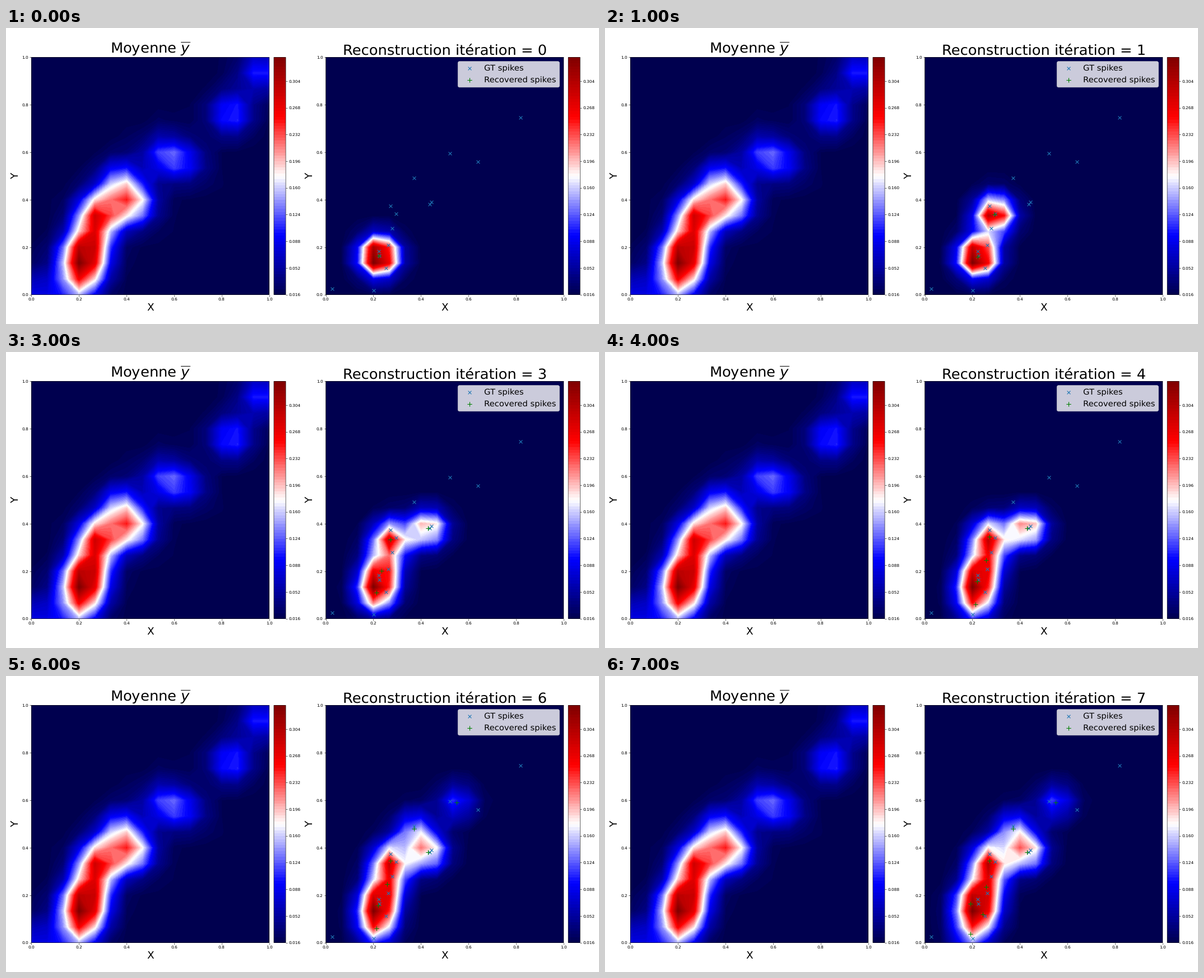
A matplotlib script for the animation above (8 s loop, 1058 px wide and 529 px high).

```python
import numpy as np
import matplotlib.pyplot as plt
from matplotlib.animation import FuncAnimation

WIDTH, HEIGHT, DPI = 1058, 529, 52.9
SIDE, TOP = 424.3, 52.35
CMAP, BANDS = "seismic", 80
SPREAD, MEAN_SPREAD = 0.0055, 0.0066  # twice the variance of each blur
PENALTY = 0.3

grid = np.linspace(0, 1, 16)
gx, gy = np.meshgrid(grid, grid)

TRUE_SPIKES = [
    (.026, .026), (.202, .017), (.254, .113), (.224, .163), (.223, .182),
    (.263, .210), (.280, .280), (.296, .342), (.273, .374), (.436, .380),
    (.445, .390), (.372, .492), (.521, .595), (.640, .560), (.819, .746),
]

# Sources along the filament, then the faint ones that are never recovered.
foot = [(.193, .038), (.244, .120), (.193, .165), (.258, .236)]
bend, east, bump, north = (.272, .346), (.431, .380), (.371, .479), (.550, .591)
faint = [(.335, .360), (.645, .560), (.838, .762), (.965, .940), (.025, .010)]
SOURCES = foot + [bend, east, bump, north] + faint
STRENGTHS = [.50, .50, .60, .60, .68, .62, .45, .31, .20, .28, .38, .34, .25]

column = [(.213, .061), (.219, .158), (.258, .247), bend, east]
ITERATIONS = [
    [(.223, .163)],
    [(.222, .160), (.293, .338)],
    [(.221, .158), (.269, .330), east],
    [(.213, .110), (.234, .203), (.272, .335), east],
    column,
    column + [north],
    column + [north, bump],
    foot + [bend, east, north, bump],
]


def kernel(points, spread):
    """One column per point: its Gaussian spot on the flattened grid."""
    x, y = np.transpose(points)
    dist2 = (gx.reshape(-1, 1) - x) ** 2 + (gy.reshape(-1, 1) - y) ** 2
    return np.exp(-dist2 / spread)


def reconstruct(points):
    """Penalised least-squares fit of the mean image, scaled to a peak of one."""
    spots = kernel(points, SPREAD)
    weights = np.linalg.solve(spots.T @ spots, spots.T @ mean - PENALTY)
    image = spots @ np.maximum(weights, 0)
    return (image / image.max()).reshape(gx.shape)


def add_axes(left, width):
    return fig.add_axes([left / WIDTH, 1 - (TOP + SIDE) / HEIGHT,
                         width / WIDTH, SIDE / HEIGHT])


def add_panel(left):
    ax = add_axes(left, SIDE)
    ax.set(xlim=(0, 1), ylim=(0, 1), facecolor=plt.get_cmap(CMAP)(0.5 / BANDS))
    ax.set_xlabel("X", fontsize=25)
    ax.set_ylabel("Y", fontsize=25)
    return ax


def add_colorbar(left):
    bar = fig.colorbar(mean_map, cax=add_axes(left, SIDE / 20))
    bar.set_ticks(0.016 + 0.036 * np.arange(9))


plt.rcParams.update({"font.family": "DejaVu Sans", "text.hinting": "none",
                     "path.snap": False})
fig = plt.figure(figsize=(WIDTH / DPI, HEIGHT / DPI), dpi=DPI)

noise = np.abs(np.random.default_rng(4).normal(0, 0.006, gx.size))
mean = kernel(SOURCES, MEAN_SPREAD) @ STRENGTHS + noise
mean /= mean.max()

mean_ax = add_panel(45.4)
mean_map = mean_ax.contourf(grid, grid, 0.016 + 0.3199 * mean.reshape(gx.shape),
                            levels=np.linspace(0.016, 0.336, BANDS + 1),
                            cmap=CMAP)
mean_ax.set_title(r"Moyenne $\overline{y}$", fontsize=35)
add_colorbar(477.9)

rec_ax = add_panel(570.6)
add_colorbar(1003.1)
rec_ax.scatter(*np.transpose(TRUE_SPIKES), marker="x", s=64, c="C0",
               linewidths=1.5, zorder=2, label="GT spikes")
found = rec_ax.scatter([], [], marker="+", s=128, c="g", linewidths=1.5,
                       zorder=2, label="Recovered spikes")
rec_ax.legend(fontsize=20, loc="upper right")
rec_map = None


def draw(i):
    global rec_map
    if rec_map is not None:
        rec_map.remove()
    points = ITERATIONS[i]
    rec_map = rec_ax.contourf(grid, grid, reconstruct(points), cmap=CMAP,
                              levels=np.linspace(0, 1, BANDS + 1), zorder=1)
    found.set_offsets(points)
    rec_ax.set_title(f"Reconstruction itération = {i}", fontsize=35)
    return [found]


anim = FuncAnimation(fig, draw, frames=len(ITERATIONS), interval=1000,
                     repeat=True, repeat_delay=0)
plt.show()
```
